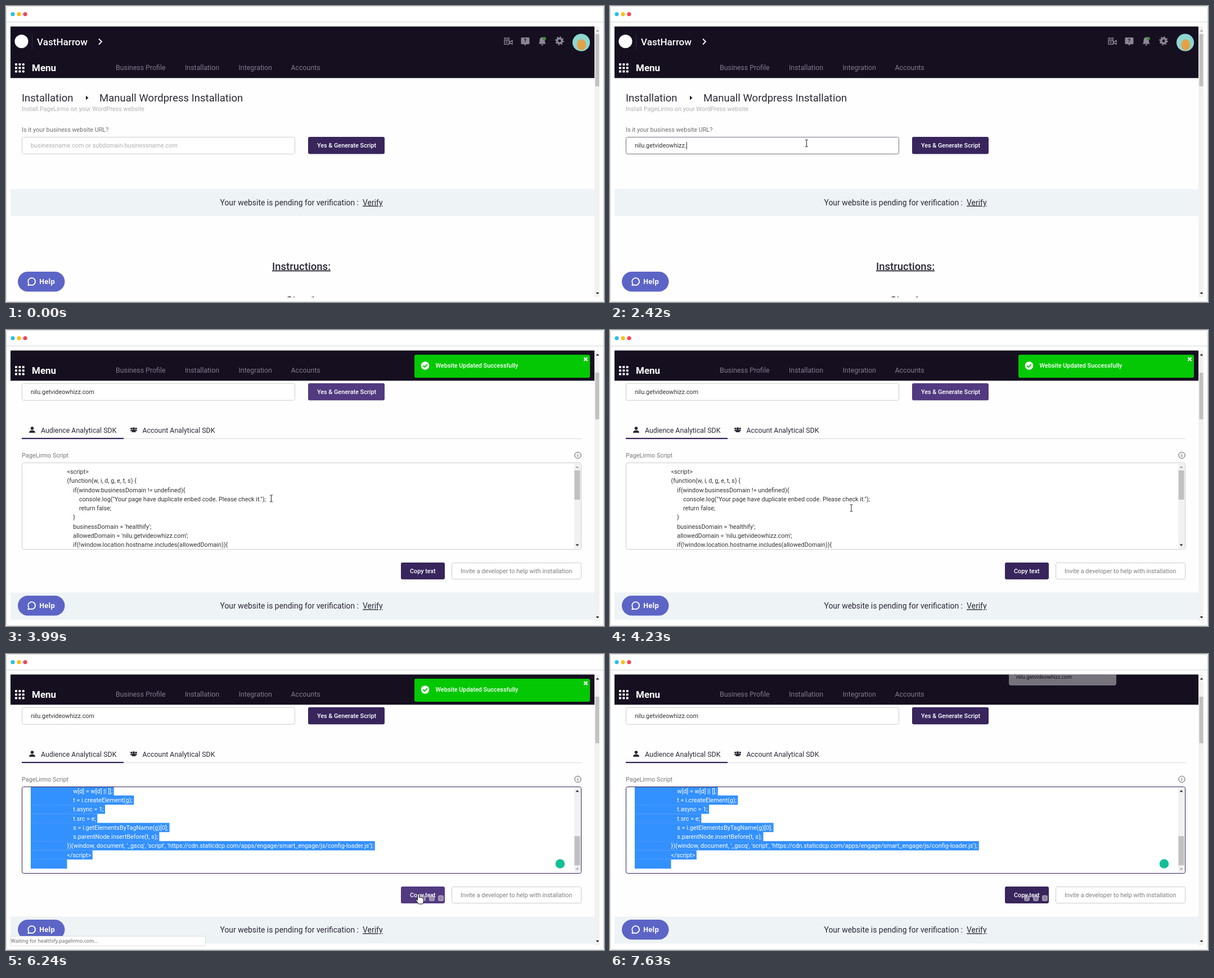
Animation of 1063x527 px, one loop 7.71 s. Source, as an HTML page:

```html
<!DOCTYPE html>
<html lang="en">
<head>
<meta charset="utf-8">
<title>Script installation walkthrough</title>
<style>
  html, body { margin: 0; width: 100%; height: 100%; overflow: hidden; background: #fff; }
  svg { display: block; width: 1063px; height: 527px; }
  text { font-family: Roboto, Arial, sans-serif; white-space: pre; }
  text.ui { font-family: "Noto Sans", "Open Sans", sans-serif; }
</style>
</head>
<body>
<svg id="stage" viewBox="0 0 1063 527" xmlns="http://www.w3.org/2000/svg"></svg>
<script>
const LOOP = 7710;
const SMALL = 10.84, MID = 12.39, LARGE = 13.93, TITLE = 18.55;
const SITE = 'nilu.getvideowhizz.com';
const PURPLE = '#38255c', HOVER = '#523a80', INK = '#2b2935';
const ROW = 16.25, INDENT = 10.75;

// Markup helpers; text is placed by its vertical middle.
const text = (x, cy, size, str, fill = INK, more = '') =>
  `<text x="${x}" y="${cy + size * 0.355}" font-size="${size}" fill="${fill}" ${more}>` +
  str.replace(/&/g, '&amp;').replace(/</g, '&lt;') + '</text>';
const rect = (x, y, w, h, fill, more = '') =>
  `<rect x="${x}" y="${y}" width="${w}" height="${h}" fill="${fill}" ${more}/>`;
const dot = (x, y, r, fill, more = '') =>
  `<circle cx="${x}" cy="${y}" r="${r}" fill="${fill}" ${more}/>`;
const path = (d, fill, more = '') => `<path d="${d}" fill="${fill}" ${more}/>`;
const line = (d, stroke, w = 1, more = '') =>
  path(d, 'none', `stroke="${stroke}" stroke-width="${w}" ${more}`);
const group = (id, body, more = '') => `<g id="${id}" ${more}>${body}</g>`;
const arrow = (id, x, y, dir) =>
  path(`M${x - 3} ${y + dir * 1.5}h6l-3 ${-dir * 3.2}z`, '#222', `id="${id}"`);
const BOLD = 'font-weight="700"', MEDIUM = 'font-weight="500"';
const UI = 'class="ui"', UNDER = 'text-decoration="underline"';

const code = [
  [0, '<script>'],
  [0, '(function(w, i, d, g, e, t, s) {'],
  [1, 'if(window.businessDomain != undefined){'],
  [2, 'console.log("Your page have duplicate enbed code. Please check it.");'],
  [2, 'return false;'],
  [1, '}'],
  [1, "businessDomain = 'healthify';"],
  [1, `allowedDomain = '${SITE}';`],
  [1, 'if(!window.location.hostname.includes(allowedDomain)){'],
  [2, 'console.log("Your page have not authorised. Please check it.");'],
  [2, 'return false;'],
  [1, '}'],
  [1, 'console.log("Your script is ready...");'],
  [1, 'w[d] = w[d] || [];'],
  [1, 't = i.createElement(g);'],
  [1, 't.async = 1;'],
  [1, 't.src = e;'],
  [1, 's = i.getElementsByTagName(g)[0];'],
  [1, 's.parentNode.insertBefore(t, s);'],
  [0, "})(window, document, '_gscq', 'script', 'https://cdn.staticdcp.com/apps/engage/smart_engage/js/config-loader.js');"],
  [0, '<\/script>'],
  [0, '']
];

function windowFrame() {
  return rect(0.5, 0.5, 1062, 526, '#fff', 'rx="4" stroke="#cdd0d3"') +
    line('M0 28.5H1063', '#d3d6d8') +
    dot(12, 14.5, 3.6, '#2bbfe8') + dot(23, 14.5, 3.6, '#fdbd14') + dot(34, 14.5, 3.6, '#f5455c');
}

function banner(y) {
  return rect(8, y, 1038, 48, '#eef3f6') +
    text(380.5, y + 23.7, LARGE, 'Your website is pending for verification :') +
    text(634, y + 23.7, LARGE, 'Verify', INK, UNDER);
}

function intro() {
  return text(28, 163, TITLE, 'Installation') + path('M142 159.5l4.5 4-4.5 4z', '#222') +
    text(166, 163, TITLE, 'Manuall Wordpress Installation') +
    text(28, 183.5, SMALL, 'Install PageLirmo on your WordPress website', '#b0b0b4') +
    text(28, 220, SMALL, 'Is it your business website URL?', '#6f6f75') +
    rect(28.5, 233.5, 485, 30, '#fff', 'rx="3" stroke="#ccc" id="field"') +
    text(44, 248.5, SMALL, '', '#333', 'id="typed"') +
    rect(44, 242, 1, 13, '#222', 'id="caret"') +
    rect(537, 233, 136, 30.5, PURPLE, 'rx="3" id="yes"') +
    text(553, 248, SMALL, 'Yes & Generate Script', '#fff', MEDIUM);
}

function pending() {
  return banner(326) +
    text(473, 463, TITLE, 'Instructions:', INK, MEDIUM + ' ' + UNDER) +
    text(498, 523, TITLE, 'Step 1', INK, MEDIUM);
}

function scriptPanel() {
  const lines = code.map(([n, s], i) =>
    text(108.5 + n * INDENT, 252.3 + i * ROW, SMALL, s, '#333', 'class="code"')).join('');
  const user = x => dot(x, 175, 2.8, INK) + path(`M${x - 5.5} 183q0-4.5 5.5-4.5t5.5 4.5z`, INK);
  const people = dot(222.8, 175.5, 1.7, INK) + dot(231.2, 175.5, 1.7, INK) + dot(227, 175.5, 2.3, INK) +
    path('M221 180q0-2.5 2.5-2.5h7q2.5 0 2.5 2.5h-2.5v2h-7v-2z', INK);
  return user(46.5) + text(62, 178.5, MID, 'Audience Analytical SDK') +
    people + text(242.5, 178.5, MID, 'Account Analytical SDK') +
    line('M28 193.5H1023', '#d8d8dc') + rect(28, 192, 181, 2.2, '#33215a') +
    text(28, 223, SMALL, 'PageLirmo Script', '#77777d') +
    dot(1016.5, 223, 5.6, 'none', 'stroke="#555"') + rect(1016, 222, 1, 4, '#555') + rect(1016, 220, 1, 1.2, '#555') +
    rect(28.5, 236.5, 994, 154, '#fff', 'rx="3" stroke="#ccc" id="area"') +
    `<g clip-path="url(#areaClip)">${group('code', group('marks', '') + lines)}</g>` +
    rect(1010, 238, 11.5, 151, '#f1f1f1') + rect(1010.5, 250, 10, 52, '#c1c1c1', 'id="areaThumb"') +
    arrow('areaUp', 1015.5, 244, 1) + arrow('areaDown', 1015.5, 383, -1) +
    dot(985, 373.5, 8.3, '#14bf96', 'id="badge"') +
    rect(702, 414, 78, 30, PURPLE, 'rx="3" id="copy"') +
    text(718, 429, SMALL, 'Copy text', '#fff', MEDIUM) +
    group('chips', [741, 757, 773].map(x =>
      rect(x - 5, 429.5, 10, 10.5, '#d5d1dc', 'rx="3"') +
      line(`M${x - 2.5} 433h5m-5 3h5`, '#77708a')).join(''), 'opacity=".65"') +
    rect(792.5, 414.5, 230, 29, '#fff', 'rx="3" stroke="#ccc"') +
    text(808, 429, SMALL, 'Invite a developer to help with installation', '#7d7d83') +
    banner(467.5);
}

function header() {
  const grey = '#8a8696';
  const nav = [[195, 'Business Profile'], [318, 'Installation'], [413.5, 'Integration'], [506.5, 'Accounts']];
  let grid = '';
  for (let i = 0; i < 9; i++) grid += rect(16 + i % 3 * 6.4, 102 + Math.floor(i / 3) * 6.2, 4, 4, '#fff', 'rx="1"');
  const camera = line('M886 61.5h8.5v6.5h-8.5zM895 64l5-2.5v6.5l-5-2.5M888 64.5h4', grey, 1.4) +
    dot(887.5, 58, 1.7, 'none', `stroke="${grey}" stroke-width="1.3"`) + dot(893, 58, 1.7, 'none', `stroke="${grey}" stroke-width="1.3"`);
  const help = path('M917 56h12q1.5 0 1.5 1.5v9q0 1.5-1.5 1.5h-4l-2 2.5-2-2.5h-4q-1.5 0-1.5-1.5v-9q0-1.5 1.5-1.5z', grey) +
    text(920.6, 62, 9.5, '?', '#150f20', BOLD);
  const bell = path('M946.5 67.5q2-1.5 2-6 0-5.5 4.7-6 4.7.5 4.7 6 0 4.5 2 6zM951 68.5h4.5q-.5 2-2.2 2t-2.3-2z', grey) +
    dot(957, 58, 3, '#3f8a36');
  const gear = dot(984, 62, 4.3, 'none', `stroke="${grey}" stroke-width="3.6"`) +
    dot(984, 62, 6.7, 'none', `stroke="${grey}" stroke-width="2.2" stroke-dasharray="2.63"`);
  const avatar = dot(1022.5, 65, 15.5, '#8dd7d0') +
    `<g clip-path="url(#faceClip)"><ellipse id="figure" cx="1023" cy="69" rx="8" ry="10" fill="#e3a24a"/></g>`;
  const top = dot(27.5, 63, 12, '#fff') + line('M46.5 50v27', '#35303f') +
    text(55, 63.5, 17.1, 'VastHarrow', '#fff', MEDIUM) +
    line('M165 58.5l5 5-5 5', '#fff', 1.8) + camera + help + bell + gear + avatar;
  return rect(8, 0, 1038, 128.3, '#150f20') + group('topRow', top) + grid +
    text(46, 109.5, 17, 'Menu', '#fff', BOLD) +
    nav.map(([x, s]) => text(x, 109.5, MID, s, '#817c8d')).join('');
}

function toast() {
  return rect(726, 44, 312, 41, '#04c804', 'rx="3"') + dot(745, 63.5, 7.3, '#fff') +
    line('M741.5 63.5l2.6 2.6 4.6-4.8', '#04c804', 2) +
    text(763.5, 63, SMALL, 'Website Updated Successfully', '#fff', MEDIUM) +
    line('M1027.5 49l6 6m0-6l-6 6', '#fff', 2.2);
}

function dropdown() {
  return rect(28, 266, 148.5, 172, '#fff', 'rx="2" filter="url(#shade)"') +
    rect(28, 406, 148.5, 32, '#f7f7f7') + line('M28 405.5h148.5', '#e4e4e4') +
    text(37, 285.5, 9.75, 'zuzi', '#222', UI) +
    text(37, 301.5, 8.75, 'pim.tellow@example.com', '#666', UI) +
    text(37, 330, 9.75, 'zuzi.com', '#222', UI) + text(37, 358, 9.75, 'pim', '#222', UI) +
    text(37, 386, 9.75, 'test', '#222', UI) + text(37, 422.5, 9.75, 'Manage...', '#666', UI);
}

function helpButton() {
  return rect(21, 473, 83.5, 35.5, '#5c65c6', 'rx="17.7"') +
    path('M39.3 497.3l1-3.2a6.4 6.4 0 1 1 3 2.4z', 'none', 'stroke="#fff" stroke-width="1.8" stroke-linejoin="round"') +
    text(59, 491, 12.2, 'Help', '#fff', UI + ' ' + BOLD);
}

function cursors() {
  const hand = path('M-1.5 1q1.5-2 3 0v6l1-1q2-.5 2.3.8 2-.6 2.4.9 2-.3 2 1.6v4q0 2-1.5 4.7h-7.5q-1-2-4.5-6.5-.5-2 1.6-1.3l1.2 1.3z',
    '#fff', 'stroke="#111" stroke-width="1"');
  const pointer = path('M0 0v12.5l2.9-2.6 2 4.6 2.2-1-2-4.4h4z', '#fff', 'stroke="#111" stroke-width="1"');
  const beam = line('M-2.5-6h2l.5.5.5-.5h2M0-5.5v11M-2.5 6h2l.5-.5.5.5h2', '#222');
  return group('halo', dot(0, 0, 9, '#f6e70c', 'opacity=".8"')) +
    group('hand', hand) + group('pointer', pointer) + group('beam', beam);
}

document.getElementById('stage').innerHTML = `<defs>
  <clipPath id="pageClip"><rect x="8" y="36.5" width="1038" height="482"/></clipPath>
  <clipPath id="areaClip"><rect x="29" y="237" width="980" height="153"/></clipPath>
  <clipPath id="faceClip"><circle cx="1022.5" cy="65" r="15.5"/></clipPath>
  <filter id="shade" x="-10%" y="-10%" width="120%" height="120%">
    <feDropShadow dx="0" dy="1" stdDeviation="1.5" flood-opacity=".4"/></filter></defs>` +
  windowFrame() +
  `<g clip-path="url(#pageClip)">` + rect(8, 36, 1038, 483, '#fefefe') +
    group('page', intro() + group('pending', pending()) + group('panel', scriptPanel(), 'transform="translate(0 138.3)"')) +
    group('header', header()) + group('toast', toast()) + helpButton() +
    group('card', rect(709, 20, 191, 36, '#fff', 'rx="4"') + text(722, 41, 9, SITE, '#000', UI)) +
  '</g>' +
  rect(1046, 36.5, 9, 482, '#f1f1f1') + rect(1047.5, 50, 7, 93, '#c1c1c1', 'id="thumb"') +
  arrow('pageUp', 1051.5, 44, 1) + arrow('pageDown', 1051.5, 511.5, -1) +
  group('dropdown', dropdown()) +
  group('status', rect(7.5, 502.5, 347, 17, '#fff', 'rx="2" stroke="#ddd"') +
    text(8.5, 511, 8.75, 'Waiting for healthify.pagelirmo.com...', '#666', UI)) +
  `<g clip-path="url(#pageClip)">${cursors()}</g>`;

const el = {};
document.querySelectorAll('[id]').forEach(n => el[n.id] = n);
const set = (id, attrs) => { for (const k in attrs) el[id].setAttribute(k, attrs[k]); };
const show = (id, on) => el[id].style.display = on ? '' : 'none';
const fade = (id, a) => { el[id].style.opacity = a; show(id, a > 0); };
const move = (id, x, y) => set(id, { transform: `translate(${x} ${y})` });
const ramp = (t, a, b) => Math.min(1, Math.max(0, (t - a) / (b - a)));
const smooth = u => u * u * (3 - 2 * u);
const within = (t, a, b) => t >= a && t < b;

// Selection bars follow the measured text widths.
function drawMarks() {
  const rows = [...document.querySelectorAll('.code')];
  el.marks.innerHTML = rows.map((n, i) => {
    const w = 64.5 + code[i][0] * INDENT + n.getComputedTextLength() + (code[i][1] ? 2.5 : 0);
    return rect(44, 244 + i * ROW, w, ROW + 0.2, '#3390ff');
  }).join('');
}
drawMarks();
if (document.fonts) document.fonts.ready.then(drawMarks);

// Pointer stops: time, x, y.
const route = [
  [0, 880, 530], [70, 880, 512], [480, 370, 312], [690, 256, 254], [770, 228, 236],
  [880, 205, 219], [980, 191, 216], [1150, 196, 243], [1650, 196, 243], [1870, 244, 247],
  [2380, 325, 243], [2800, 576, 258], [3600, 576, 258], [4150, 429, 317], [4760, 429, 317],
  [5000, 645, 410], [5250, 733, 427], [6700, 733, 427], [7020, 625, 115], [7140, 640, 90],
  [7390, 715, 30], [LOOP, 715, 20]
];
function pointerAt(t) {
  const i = Math.max(1, route.findIndex(p => t < p[0]));
  const [a, b] = [route[i - 1], route[i]];
  const u = ramp(t, a[0], b[0]);
  return [a[1] + (b[1] - a[1]) * u, a[2] + (b[2] - a[2]) * u];
}

function draw(t) {
  const expanded = t >= 3280, selected = t >= 5870;
  const scroll = 138.3 * smooth(ramp(t, 3600, 3980));
  const inner = selected ? 219.6 : 77.7 * ramp(t, 4380, 4610);
  const [x, y] = pointerAt(t);
  const over = (l, top, w, h) => x >= l && x <= l + w && y >= top && y <= top + h;
  const overYes = over(537, 233 - scroll, 136, 30.5);
  const overCopy = expanded && over(702, 552 - scroll, 78, 30);
  const overText = over(28, 233 - scroll, 485, 30) || (expanded && over(28, 375 - scroll, 982, 154));

  // Page position and header
  move('page', 0, -scroll);
  move('header', 0, -Math.min(38, scroll));
  show('topRow', scroll < 30);
  show('pending', !expanded);
  show('panel', expanded);
  set('thumb', { y: 50 + 26 * scroll / 138.3, height: expanded ? 83 : 93 });
  set('pageUp', { fill: scroll > 0 ? '#222' : '#a3a3a3' });
  set('figure', { cx: 1023 + 1.5 * Math.sin(t / 260), cy: 69 + Math.sin(t / 190) });

  // Address field
  const focus = within(t, 1200, 2960);
  const count = Math.floor(SITE.length * ramp(t, 2000, 2480));
  el.typed.textContent = count ? SITE.slice(0, count) : 'businessname.com or subdomain.businessname.com';
  set('typed', { fill: count ? '#333' : '#b0b0b4' });
  set('field', { stroke: focus ? '#77727f' : '#ccc' });
  set('caret', { x: 44 + (count ? el.typed.getComputedTextLength() : 0) });
  show('caret', focus && (t % 1000 > 500 || within(t, 2000, 2520)));
  show('dropdown', within(t, 1250, 2040));
  set('yes', { fill: overYes || within(t, 2960, 5700) ? HOVER : PURPLE });

  // Script panel
  move('code', 0, -inner);
  show('marks', selected);
  document.querySelectorAll('.code').forEach(n => n.setAttribute('fill', selected ? '#fff' : '#333'));
  set('area', { stroke: selected ? '#33215a' : '#ccc' });
  set('areaThumb', { y: 250 + inner * 0.338 });
  set('areaUp', { fill: inner > 0 ? '#222' : '#a3a3a3' });
  set('areaDown', { fill: selected ? '#a3a3a3' : '#222' });
  set('copy', { fill: overCopy ? HOVER : PURPLE });
  show('badge', t >= 5950);
  show('chips', t >= 5950);

  // Overlays
  fade('toast', ramp(t, 3480, 3640) * (1 - ramp(t, 6540, 6860)));
  show('status', within(t, 5950, 6500));
  fade('card', 0.42 * ramp(t, 7400, 7630));

  // Pointer
  const kind = overYes || overCopy ? 'hand' : overText ? 'beam' : 'pointer';
  ['hand', 'beam', 'pointer'].forEach(k => { show(k, k === kind); move(k, x, y); });
  move('halo', x, y);
  show('halo', within(t, 1150, 1650) || within(t, 2900, 3120) || within(t, 5320, 5700));
}

const start = performance.now();
function tick() {
  draw((performance.now() - start) % LOOP);
  requestAnimationFrame(tick);
}
tick();
</script>
</body>
</html>
```
